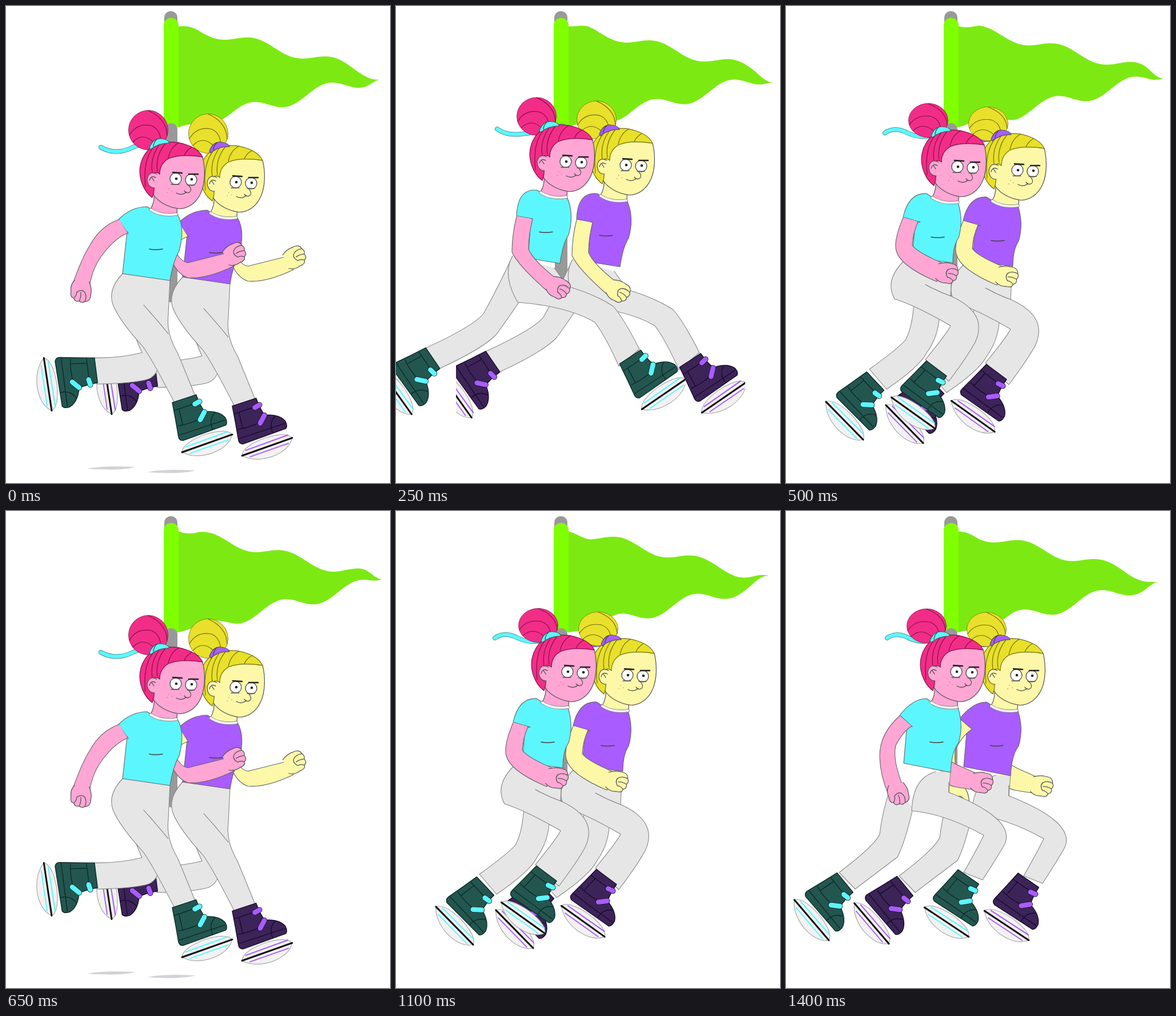
Recreate the animation shown at these times as an HTML page. Size 672x834 px, loop 1450 ms.

```html
<!DOCTYPE html>
<html lang="en">
<head>
<meta charset="utf-8">
<title>Skaters and flag</title>
<style>
html, body { margin: 0; width: 100%; height: 100%; overflow: hidden; background: #fff; }
svg { display: block; width: 100vw; height: 100vh; }
path, ellipse, circle { stroke-linecap: round; stroke-linejoin: round; }
</style>
</head>
<body>
<svg id="stage" viewBox="0 0 672 834">
  <clipPath id="crop"><rect width="506" height="834"/></clipPath>
  <rect x="277" y="9" width="23" height="60" rx="11.5" fill="#999"/>
  <path id="flag" fill="#7cea12"/>
  <rect x="276" y="21" width="26" height="191" rx="12.5" fill="#80ff00"/>
  <rect x="276" y="40" width="26" height="172" fill="#80ff00"/>
  <rect x="278" y="205" width="22" height="313" rx="11" fill="#999"/>
</svg>
<script>
const LOOP = 1450, STEP = 50, STRIDE = 600, HOLD = 75;
const KEYS = [0, 2, 3, 6, 8];
const stage = document.getElementById('stage');
const flag = document.getElementById('flag');

// Each part has one shape for every key pose.
const POSES = {
  farArm: [
    'M290 405 Q298 445 318 449 L386 432 L398 455 Q350 478 318 475 Q298 468 288 440',
    'M270 430 Q288 437 300 444 L336 460 L332 488 Q300 483 295 482 Q288 481 270 470',
    'M255 390 Q262 400 265 405 L270 412 L262 420 Q258 418 255 415 Q250 405 250 400',
    'M255 390 Q262 400 265 405 L270 412 L262 420 Q258 418 255 415 Q250 405 250 400'],
  farHand: [
    'translate(400 434) rotate(-24)', 'translate(342 475) rotate(12)',
    'translate(264 408) rotate(30)', 'translate(262 408) rotate(20)'],
  rearLeg: [
    'M205 520 Q230 590 238 606 Q200 616 155 615 L159 661 Q225 660 250 652 Q275 640 265 600',
    'M188 470 Q170 515 164 565 Q155 585 93 632 L121 661 Q175 620 195 605 Q208 580 222 520',
    'M204 437 Q180 490 153 538 Q135 560 52 598 L76 634 Q150 600 175 575 Q190 555 222 508',
    'M224 515 Q222 560 209 584 Q195 600 146 635 L176 670 Q235 630 247 605 Q265 580 268 548'],
  rearBoot: [
    'translate(157 637) rotate(84)', 'translate(103 650) rotate(52)',
    'translate(64 616) rotate(57)', 'translate(156 656) rotate(48)'],
  frontLeg: [
    'M204 468 Q178 495 187 522 Q198 550 240 596 Q256 618 296 696 L332 684 Q306 620 300 606 Q280 572 284 540 L287 478',
    'M262 456 Q222 466 220 524 Q280 530 346 567 Q335 590 311 632 L344 645 Q370 605 383 582 Q402 538 285 492 L288 456',
    'M204 437 Q185 470 213 518 Q300 525 348 553 Q368 580 390 630 L426 600 Q398 545 380 525 Q350 505 300 490 L277 458',
    'M206 446 Q172 480 190 512 Q230 525 288 559 Q282 572 244 618 L285 656 Q318 612 331 588 Q355 537 288 507 L291 448'],
  frontBoot: [
    'translate(312 687) rotate(-17)', 'translate(319 640) rotate(36)',
    'translate(410 614) rotate(-32)', 'translate(263 634) rotate(38)'],
  crease: [
    'M241 523 Q262 546 284 573', 'M285 474 Q285 484 285 492',
    'M277 476 Q288 484 300 490', 'M244 487 Q265 499 288 507'],
  shirt: [
    'M247 351 Q219 351 197 373 L214 398 L212 394 L204 468 L287 480 Q292 448 303 428 Q314 388 300 364 Q272 368 247 351Z',
    'M246 328 Q222 328 199 357 L221 377 L212 371 L206 441 L288 457 Q290 420 302 405 Q311 375 301 344 Q270 345 246 328Z',
    'M247 322 Q213 318 211 367 L239 372 L236 373 L231 441 L287 450 Q292 415 302 400 Q312 365 300 336 Q270 338 247 322Z',
    'M246 328 Q215 326 205 369 L235 378 L226 378 L221 440 L292 449 Q292 420 302 405 Q311 375 301 344 Q270 345 246 328Z'],
  tail: [
    'M166 247 Q192 262 222 247 Q238 240 254 242', 'M177 222 Q194 210 217 223 Q236 231 256 226',
    'M177 215 Q194 227 218 224 Q236 223 254 217', 'M173 222 Q190 210 213 222 Q234 232 256 226'],
  bun: [
    'translate(249 217) scale(1 1)', 'translate(246 201) scale(1 .87)',
    'translate(246 193) scale(1 .96)', 'translate(249 200) scale(1 .86)'],
  head: ['translate(0 0)', 'translate(1 -21)', 'translate(0 -30)', 'translate(3 -21)'],
  nearArm: [
    'M198 373 Q165 385 147 418 Q133 440 117 485 L146 490 Q152 455 171 432 Q192 405 213 397',
    'M199 358 Q163 390 164 430 Q165 465 180 497 L205 482 Q186 435 192 410 Q205 385 220 376',
    'M211 368 Q203 400 203 430 Q212 452 263 497 L281 477 Q240 445 232 425 Q232 400 239 373',
    'M205 370 Q188 410 193 428 Q200 455 264 482 L275 450 Q228 430 221 418 Q222 398 231 377'],
  nearHand: [
    'translate(131 498) rotate(96)', 'translate(196 494) rotate(78)',
    'translate(284 493) rotate(32)', 'translate(281 467) rotate(12)']
};

const line = (d, color = '#444', w = 1.2) =>
  `<path d="${d}" fill="none" stroke="${color}" stroke-width="${w}"/>`;
const shape = (d, fill, color = '#555', w = 1.2) =>
  `<path d="${d}" fill="${fill}" stroke="${color}" stroke-width="${w}"/>`;
const part = (name, fill, color = '#666') =>
  `<path data-part="${name}" fill="${fill}" stroke="${color}" stroke-width="1.1"/>`;
const group = (name, inner) => `<g data-part="${name}">${inner}</g>`;

function boot(c) {
  const strap = d => line(d, c.bootInk, 10) + line(d, c.accent, 8.5);
  return shape('M-31 88Q-26 73 16 70Q56 70 62 84Q51 103 18 105Q-14 105 -31 88Z', '#f2f2f2', '#aaa') +
    line('M-22 81L56 77', c.accent, 2) + line('M-18 94L53 91', c.accent, 1.8) +
    line('M-31 88L62 84', '#111', 3) +
    shape('M-22 0L22 -1Q23 20 28 32Q52 37 59 52Q61 62 56 65L-23 69Q-30 67 -29 60Q-25 30 -22 0Z', c.boot, c.bootInk, 1.4) +
    line('M-22 14L22 13M-24 42Q-4 45 18 41M-27 58L57 56M32 65Q30 47 44 39M-14 14L-16 43', c.bootInk, 1.4) +
    strap('M15 14L24 12') + strap('M16 43L27 32');
}

const fist = c => shape('M-17 -13Q-6 -19 4 -18Q17 -19 18 -9Q22 -4 18 1Q21 8 14 11Q13 18 3 17Q-8 20 -17 13', c.skin) +
  line('M18 -9Q8 -12 2 -7M18 1Q9 -2 3 0M14 11Q8 6 3 7M2 -7Q-4 -2 3 7', '#555', 1.3);

const bun = c => `<circle r="34.5" fill="${c.hair}" stroke="${c.hairInk}" stroke-width=".8"/>` +
  line('M-33 9Q-20 -13 5 -8Q21 -2 22 20M-27 21Q-10 3 9 21M0 -34Q32 -20 33 10', c.hairInk);

function head(c) {
  const eye = (x, y) => `<ellipse cx="${x}" cy="${y}" rx="10" ry="10" fill="#fff" stroke="#444" stroke-width="1.2"/>`;
  const dot = (x, y) => `<circle cx="${x}" cy="${y}" r="2.3" fill="#222"/>`;
  return line('M251 425Q262 427 274 425', '#444', 1.4) +
    shape('M259 322Q261 342 253 355Q272 367 299 363L300 345Z', c.skin) +
    line('M253 356Q272 368 298 364', '#777', 5.5) + line('M253 356Q272 368 298 364', '#f3f3f3', 4) +
    shape('M344 264C349 283 349 309 341 327C333 345 318 354.5 303 354.5C283 352 265 342 257 328L253 300L270 270Q300 255 344 264Z', c.skin) +
    shape('M344 264C335 245 300 233 270 240C245 246 234 270 234 290C235 312 246 328 256 335Q260 324 259 316L255 295Q264 288 269 294Q269 276 284 267Q305 258 344 264Z', c.hair, c.hairInk) +
    line('M268 243Q252 265 256 291M279 240Q261 262 265 289M303 239Q288 246 284 266M325 247Q316 252 312 261M258 247Q239 270 244 316', c.hairInk) +
    shape('M264 294Q250 287 247 303Q248 318 260 318', c.skin) +
    line('M251 305Q254 295 262 300M255 300L259 306') +
    shape('M251 248Q257 231 271 232Q284 233 286 240Q268 239 253 251Z', c.accent) + line('M264 233Q258 238 258 246') +
    eye(297, 302) + eye(324, 304) + dot(298, 302) + dot(325, 303) +
    line('M292 291L308 292M320 294L336 294', '#222', 2.6) +
    line('M289 312H303M317 313H330', '#555', 1.3) +
    shape('M320 314Q326 321 322 325Q317 329 312 323', c.skin) +
    line('M298 327Q307 332 315 326') +
    line('M285 320h.1M290 324h.1M282 326h.1', '#c66', 1.4);
}

function skater(c, x, y) {
  const g = document.createElementNS('http://www.w3.org/2000/svg', 'g');
  g.setAttribute('transform', `translate(${x} ${y})`);
  g.setAttribute('clip-path', 'url(#crop)');
  g.innerHTML =
    '<path class="shade" d="M142 809Q170 803 226 806Q205 813 142 809Z" fill="#d2d2d6"/>' +
    part('farArm', c.skin) + group('farHand', fist(c)) +
    part('rearLeg', '#e6e6e6', '#888') + group('rearBoot', boot(c)) +
    part('frontLeg', '#e6e6e6', '#888') + part('crease', 'none', '#777') +
    group('frontBoot', boot(c)) + part('shirt', c.accent) +
    `<path data-part="tail" fill="none" stroke="#477" stroke-width="8"/>` +
    `<path data-part="tail" fill="none" stroke="${c.accent}" stroke-width="6.5"/>` +
    group('bun', bun(c)) + group('head', head(c)) +
    part('nearArm', c.skin) + group('nearHand', fist(c));
  stage.append(g);
}

skater({ skin: '#fdf8a8', hair: '#e8e02b', hairInk: '#77700c', accent: '#a95cff', boot: '#3c2458', bootInk: '#190b2b' }, 105, 6);
skater({ skin: '#ffa6d5', hair: '#f22d88', hairInk: '#85104a', accent: '#5cf6ff', boot: '#245650', bootInk: '#0c2b28' }, 0, 0);

const parts = [...stage.querySelectorAll('[data-part]')];
const shades = [...stage.querySelectorAll('.shade')];

// Blends every number of two equally built strings.
function mix(a, b, k) {
  const num = /-?\d*\.?\d+/g, to = b.match(num);
  let i = 0;
  return a.replace(num, n => (+n + (to[i++] - n) * k).toFixed(2));
}

function drawSkaters(t) {
  const pose = Math.floor((t % STRIDE) / HOLD);
  const i = KEYS.findIndex((k, n) => pose < KEYS[n + 1]);
  const k = (pose - KEYS[i]) / (KEYS[i + 1] - KEYS[i]);
  for (const el of parts) {
    const p = POSES[el.dataset.part];
    el.setAttribute(el.tagName === 'g' ? 'transform' : 'd', mix(p[i], p[(i + 1) % 4], k));
  }
  for (const s of shades) s.setAttribute('visibility', pose ? 'hidden' : 'visible');
}

function drawFlag(t) {
  const WAVE = 135, PERIOD = 1610, LEFT = 302, turn = 2 * Math.PI;
  const shift = WAVE * t / PERIOD;
  const tipX = 657 + 4 * Math.cos(turn * (t - 320) / LOOP);
  const tipY = 122.5 + 11.5 * Math.cos(turn * (t - 220) / LOOP);
  const wave = (x, x0) => Math.sin(turn * (x - x0 - shift) / WAVE);
  const ramp = (x, w) => Math.min(1, (x - LEFT) / w);
  const toTip = (x, y) => {
    const k = Math.max(0, 1 - (tipX - x) / 36);
    return y + (tipY - y) * k * k;
  };
  const top = x => 73 + (x - 470) * .252 + 5 * Math.exp((LEFT - x) / 60) +
    (8.4 + Math.max(0, x - 550) * .03) * ramp(x, 36) * wave(x, 470);
  const low = x => 212 - (x - LEFT) * .2514 - 11.8 * ramp(x, 100) * wave(x, 527);
  const upper = [], under = [];
  for (let n = 0; n <= 90; n++) {
    const x = LEFT + (tipX - LEFT) * n / 90;
    const a = toTip(x, top(x)), b = Math.max(a, toTip(x, low(x)));
    upper.push(`${x.toFixed(1)} ${a.toFixed(1)}`);
    under.unshift(`${x.toFixed(1)} ${b.toFixed(1)}`);
  }
  flag.setAttribute('d', `M${upper.join('L')}L${under.join('L')}Z`);
}

let start;
function tick(now) {
  start ??= now;
  const t = Math.floor(((now - start) % LOOP) / STEP) * STEP;
  drawFlag(t);
  drawSkaters(t);
  requestAnimationFrame(tick);
}
drawFlag(0);
drawSkaters(0);
requestAnimationFrame(tick);
</script>
</body>
</html>
```
